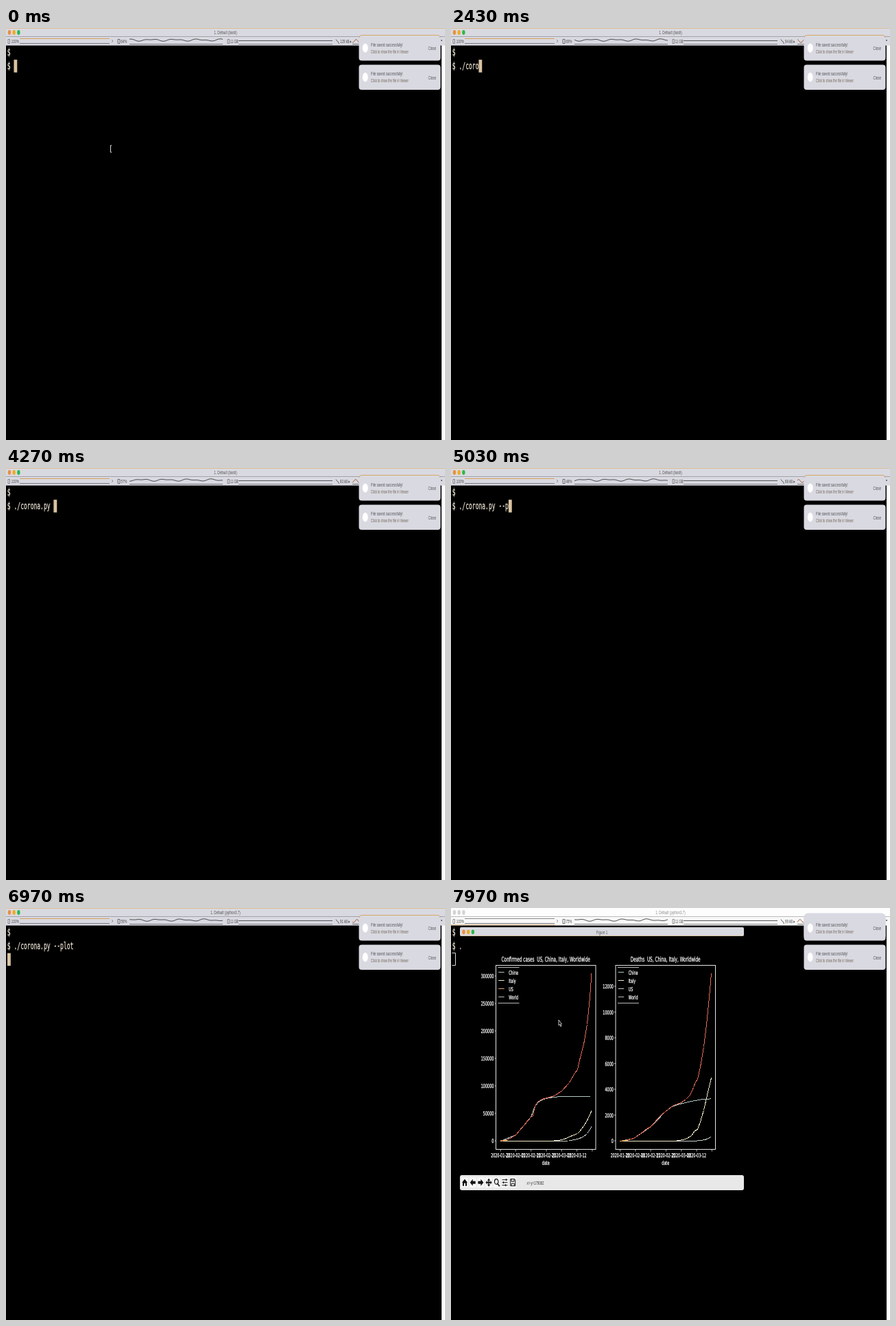
These frames come from a looping animation (640 by 600 pixels, 8 s). An HTML page:

```html
<!DOCTYPE html>
<html lang="en">
<head>
<meta charset="utf-8">
<title>Terminal plot</title>
<style>
html, body { margin: 0; width: 100%; height: 100%; overflow: hidden; background: #000; }
svg { display: block; width: 640px; height: 600px; }
text { white-space: pre; font-family: "Liberation Sans", Arial, sans-serif; }
.mono { font-family: "DejaVu Sans Mono", monospace; stroke: #e6decd; stroke-width: .3; }
.plot { font-family: "DejaVu Sans", sans-serif; stroke: #fff; stroke-width: .3; }
.crisp { shape-rendering: crispEdges; }
</style>
</head>
<body>
<svg id="stage" viewBox="0 0 640 600"></svg>
<script>
const LOOP = 8000;
const SQUEEZE = 0.6; // the whole screen is narrowed to this aspect
const CELL = 4.83, ROW = 19.5;
const BAR = '#d9d9e1';
const stage = document.getElementById('stage');

function add(parent, tag, attrs = {}) {
  const node = document.createElementNS('http://www.w3.org/2000/svg', tag);
  for (const name in attrs) node.setAttribute(name, attrs[name]);
  return parent.appendChild(node);
}
const group = (parent, attrs) => add(parent, 'g', attrs);
const rect = (p, x, y, width, height, fill, more) =>
  add(p, 'rect', { x, y, width, height, fill, ...more });
const path = (p, d, stroke, width = 1, fill = 'none') =>
  add(p, 'path', { d, stroke, 'stroke-width': width, fill });
function text(p, x, y, size, fill, content, more = {}) {
  const node = add(p, 'text', {
    x: 0, y: 0, fill, 'font-size': size,
    transform: `translate(${x} ${y}) scale(${SQUEEZE} 1)`, ...more
  });
  node.textContent = content;
  return node;
}
const middle = { 'text-anchor': 'middle' };
const show = (node, on) => node.setAttribute('visibility', on ? 'visible' : 'hidden');
const line = points => 'M' + points.join(' L');

function lights(p, x, y) {
  return [0, 1, 2].map(i => add(p, 'ellipse', { cx: x + 6.7 * i, cy: y, rx: 2.2, ry: 3.4 }));
}
function paintLights(dots, active) {
  const colours = active ? ['#e8903c', '#f2aa22', '#2db84c'] : ['#d2d2d2', '#d2d2d2', '#d2d2d2'];
  dots.forEach((dot, i) => dot.setAttribute('fill', colours[i]));
}

// Terminal
rect(stage, 0, 0, 640, 600, '#000');
rect(stage, 635, 25, 5, 575, '#fff');
const typed = [0, 1].map(i =>
  text(stage, 1.8, 40 + ROW * i, 13.4, '#e6decd', '$ ', { class: 'mono' }));
const cursor = rect(stage, 0, 0, CELL, 18.5, '#d9c3a1');
const idleCursor = path(stage, 'M1.5 65.5H6.5V83.5H1.5', '#d8d8d8');

// Title and status bars
const titleBar = rect(stage, 0, 0, 640, 12.5, BAR);
const topEdge = rect(stage, 0, 0, 640, 1, '#d9bd96');
const statusBar = rect(stage, 0, 12.5, 640, 13, BAR);
const mainLights = lights(stage, 5, 6.5);
const title = text(stage, 320, 9.2, 7.6, '#555', '', middle);
const ink = '#4a4a4a';
path(stage, 'M3 16.5h2.5v6H3z', '#666', 0.7);
text(stage, 7.8, 21.8, 7.2, ink, '100%');
const batteryTop = path(stage, 'M20 15.5H151', '#d6a05c');
path(stage, 'M20 22.5H151', '#77777c');
const batteryEdge = path(stage, 'M0 24.5H152', '#e0bd8c');
path(stage, 'M154 17l2 2-2 2', '#666', 0.7);
path(stage, 'M163 16.5h3v6h-3z', '#555', 0.8);
const cpu = text(stage, 167.6, 21.8, 7.2, ink, '');
const wave = path(stage, '', '#3e3e42', 0.9);
path(stage, 'M180 23.5H316', '#77777c');
path(stage, 'M323 16.5h2.5v6H323z', '#666', 0.7);
text(stage, 326.8, 21.8, 7.2, ink, '11 GB');
path(stage, 'M339 18.5H476', '#55555a');
path(stage, 'M339 23.5H476', '#88888d');
path(stage, 'M481 16.5l2 3M483.5 19l2 4', '#555', 0.9);
const net = text(stage, 487, 21.8, 7.2, ink, '');
const netGraph = path(stage, '', '#a4552f', 0.9);
path(stage, 'M505 23.5H515', '#77777c');
rect(stage, 634, 17, 2, 2, '#777');

// Plot window
const figure = group(stage);
rect(figure, 14.6, 40, 412.4, 352, '#000');
const figureBar = rect(figure, 13, 28, 414, 13, BAR, { rx: 2 });
const figureEdge = path(figure, 'M14 40.5H426', '#dcc6a2', 1);
const figureLights = lights(figure, 18.5, 34.8);
const figureTitle = text(figure, 220, 37.6, 7.4, '#666', 'Figure 1', middle);
const label = (x, y, size, s, anchor) =>
  text(figure, x, y, size, '#fff', s, { class: 'plot', 'text-anchor': anchor });

const DATES = ['01-22', '02-01', '02-11', '02-21', '03-02', '03-12'];
function chart({ left, heading, ticks, legendInk, curves }) {
  const width = 145.5;
  rect(figure, left, 83.5, width, 268, 'none', { stroke: '#e4e4e4' });
  label(left + width / 2, 78, 9.6, heading + '  US, China, Italy, Worldwide', 'middle');
  label(left + width / 2, 373.8, 8, 'date', 'middle');
  for (let i = 0; i < 7; i++) {
    const x = left + 6.6 + 22.3 * i;
    path(figure, `M${x} 351.5v3`, '#e4e4e4', 0.8);
    if (DATES[i]) label(x, 363, 8, '2020-' + DATES[i], 'middle');
    const y = 339 - ticks.gap * i;
    path(figure, `M${left} ${y}h-2`, '#e4e4e4', 0.8);
    label(left - 3, y + 3, 8.2, ticks.step * i, 'end');
  }
  const plot = group(figure, { class: 'crisp', transform: 'translate(.5 .5)' });
  for (const [colour, ...points] of curves) path(plot, line(points), colour);
  path(figure, `M${left + 3} 86.5H${left + 34}M${left + 3} 138.5H${left + 34}`, '#b8b8b8');
  ['China', 'Italy', 'US', 'World'].forEach((name, i) => {
    const y = 94 + 12 * i;
    path(figure, `M${left + 3.7} ${y - 0.5}h8.5`, legendInk[i]);
    label(left + 18.7, y + 3, 8, name, 'start');
  });
}
const INK = { china: '#b4c8c2', italy: '#f0e9c6', us: '#c8d2cc', world: '#e06c58' };
chart({
  left: 65.5, heading: 'Confirmed cases', ticks: { step: 50000, gap: 40 },
  legendInk: [INK.china, INK.italy, '#dca07a', '#bcbcc4'],
  curves: [
    [INK.china, '72,339', '94,330', '116,304', '122,288', '126,283', '132,279', '140,276.5', '151,274.7', '168,273.8', '204.5,273.5'],
    [INK.us, '72,339', '172,338.5', '184,336', '192,333', '198,328', '202,322', '204.5,318'],
    [INK.italy, '72,339', '145,338.8', '156,338', '165,336', '175,331.5', '184,328', '187,325', '193,317', '198,309', '204.5,295'],
    [INK.world, '72,338.5', '82,337', '94,330', '106,316', '113,307', '116,304', '119,302', '122,288', '126,282', '132,278', '140,276', '150,273', '161,266', '172,254', '180,240', '184,235', '187,221', '193,198', '198,169', '202,130', '204.5,95'],
    ['#e2a13c', '72,338.7', '82,338.2']
  ]
});
chart({
  left: 240, heading: 'Deaths', ticks: { step: 2000, gap: 37.5 },
  legendInk: [INK.china, INK.italy, '#c8c8c8', '#bcbcc4'],
  curves: [
    [INK.china, '246,339', '266,335', '291,318', '312,296', '322,288.5', '335,284.5', '350,281', '365,278.3', '379,277.3'],
    [INK.us, '246,339', '357,338.7', '370,337', '379,333'],
    [INK.italy, '246,339', '328,338.7', '342,336', '350,331', '355,324', '359,322', '363,311', '368,294', '373,272', '379,247'],
    [INK.world, '246,338.7', '254,338', '266,335', '275,329', '285,321', '291,318', '296,312', '303,304', '312,296', '316,293', '322,288', '335,283', '342,278', '348,272', '353,261', '356,253', '359,249', '363,231', '368,202', '372,170', '376,130', '379,95'],
    ['#e2a13c', '246,338.7', '258,338.2']
  ]
});

// Toolbar
rect(figure, 13, 389, 414, 22, '#e8e8e8', { rx: 3 });
const ICONS = [
  'M-4 0L0-5 4 0H3V5H1V1H-1V5H-3V0Z',
  'M-4 0L0-5V-2H4V2H0V5Z',
  'M4 0L0-5V-2H-4V2H0V5Z',
  'M0-6L2-3H.7V-1H2.5V-3L4.5 0 2.5 3V1H.7V3H2L0 6-2 3H-.7V1H-2.5V3L-4.5 0-2.5-3V-1H-.7V-3H-2Z'
];
for (let i = 0; i < 7; i++) {
  const icon = group(figure, { transform: `translate(${20 + 11.7 * i} 399.7)` });
  rect(icon, -5, -7.5, 10, 15, '#f7f7f7');
  if (ICONS[i]) path(icon, ICONS[i], 'none', 0, '#111');
  if (i === 4) {
    add(icon, 'ellipse', { cx: -0.6, cy: -1.2, rx: 2.7, ry: 3.8, fill: 'none', stroke: '#111', 'stroke-width': 1.2 });
    path(icon, 'M1.3 2L4 5.5', '#111', 1.6);
  }
  if (i === 5) path(icon, 'M-4-4H4M-4 0H4M-4 4H4M2-5.5V-2.5M-2-1.5V1.5M1 2.5V5.5', '#111', 1.1);
  if (i === 6) path(icon, 'M-3.5-5H2.5L3.5-3.5V5H-3.5ZM-2-5V-1.5H1.8V-5M-2 5V1.5H2V5', '#111', 1);
}
const readout = text(figure, 110.5, 402.6, 7.2, '#333', 'x= y=179082');

// Notifications
const halo = rect(stage, 514.5, 7.5, 119, 39, '#d9d9e5', { rx: 6 });
for (const top of [11, 53.5]) {
  rect(stage, 514.5, top, 119, 36.5, BAR, { rx: 4 });
  add(stage, 'ellipse', { cx: 523.7, cy: top + 18.2, rx: 4, ry: 6.6, fill: '#fff' });
  text(stage, 532, top + 15.6, 7.4, '#55555a', 'File saved successfully!');
  text(stage, 532, top + 25.6, 6.8, '#75695a', 'Click to show the file in Viewer');
  text(stage, 621.3, top + 21.4, 7.6, '#55555a', 'Close', middle);
}
const noticeEdge = path(stage, 'M515 14Q515 10.5 519 10.5H629Q633 10.5 633 14', '#d6a764', 1);

// Pointer
const pointer = group(stage);
const beam = path(pointer, 'M1.2-5H-.5V5H1.2', '#ddd', 1);
const arrow = path(pointer, 'M0 0V8L1.6 6.5 2.8 9.5 3.9 9 2.8 6H4.4Z', '#f2f2f2', 0.8, '#000');

// Timeline
const COMMAND = './corona.py --plot';
const KEYS = [1030, 1200, 1400, 1780, 2080, 2400, 2700, 3000, 3350, 3640, 3860, 4150, 4450, 4650, 4930, 5200, 5420, 5650];
const ENTER = 6150, OPEN = 7250, FOCUS = 7720;
const CPU = [64, 71, 69, 72, 57, 48, 53, 59, 75];
const NET = [129, 67, 94, 129, 83, 68, 77, 91, 99];

function progress(t, from, to) {
  const p = Math.min(1, Math.max(0, (t - from) / (to - from)));
  return p * p * (3 - 2 * p);
}
function pointerAt(t) {
  const out = progress(t, 30, 750), back = progress(t, 7560, 7950);
  return [153 + 16 * out - 12 * back, 176 + 42 * out - 55 * back];
}
function drawStats(second) {
  cpu.textContent = CPU[second] + '%';
  net.textContent = NET[second] + ' kB ▸';
  const points = [];
  for (let x = 180; x <= 316; x += 2) {
    const u = x + 3.4 * second;
    points.push([x, (17.5 - 1.1 * Math.sin(u / 5.4) - 0.7 * Math.sin(u / 2.9 + 1)).toFixed(2)]);
  }
  wave.setAttribute('d', line(points));
  const bumps = [];
  for (let x = 505; x <= 515; x += 2)
    bumps.push([x, (19 + 2.5 * Math.sin(x * 0.6 + second * 1.7)).toFixed(2)]);
  netGraph.setAttribute('d', line(bumps));
}
function draw(t) {
  const count = KEYS.filter(key => key <= t).length;
  const entered = t >= ENTER, opened = t >= OPEN, focused = t >= FOCUS;

  typed[1].textContent = '$ ' + COMMAND.slice(0, count);
  cursor.setAttribute('x', entered ? 2 : 1.8 + CELL * (count + 2));
  cursor.setAttribute('y', entered ? 65.7 : 46.2);
  show(cursor, !opened);
  show(idleCursor, opened);
  title.textContent = `1. Default (${entered ? 'python3.7' : 'bash'})`;
  title.setAttribute('fill', opened ? '#8c8c8c' : '#555');

  titleBar.setAttribute('fill', opened ? '#fdfdfd' : BAR);
  statusBar.setAttribute('fill', opened ? '#f8f8f8' : BAR);
  batteryTop.setAttribute('stroke', opened ? '#88888d' : '#d6a05c');
  show(batteryEdge, opened);
  show(topEdge, !opened);
  show(halo, opened);
  show(noticeEdge, !opened);
  paintLights(mainLights, !opened);

  show(figure, opened);
  figureBar.setAttribute('fill', focused ? BAR : '#fdfdfd');
  figureTitle.setAttribute('fill', focused ? '#555' : '#999');
  show(figureEdge, focused);
  show(readout, opened && t >= 7850);
  paintLights(figureLights, focused);

  const [x, y] = pointerAt(t);
  pointer.setAttribute('transform', `translate(${x} ${y})`);
  show(beam, t < KEYS[0]);
  show(arrow, opened);
  drawStats(Math.floor((t + 250) / 1000));
}
const start = performance.now();
function tick() {
  draw((performance.now() - start) % LOOP);
  requestAnimationFrame(tick);
}
tick();
</script>
</body>
</html>
```
